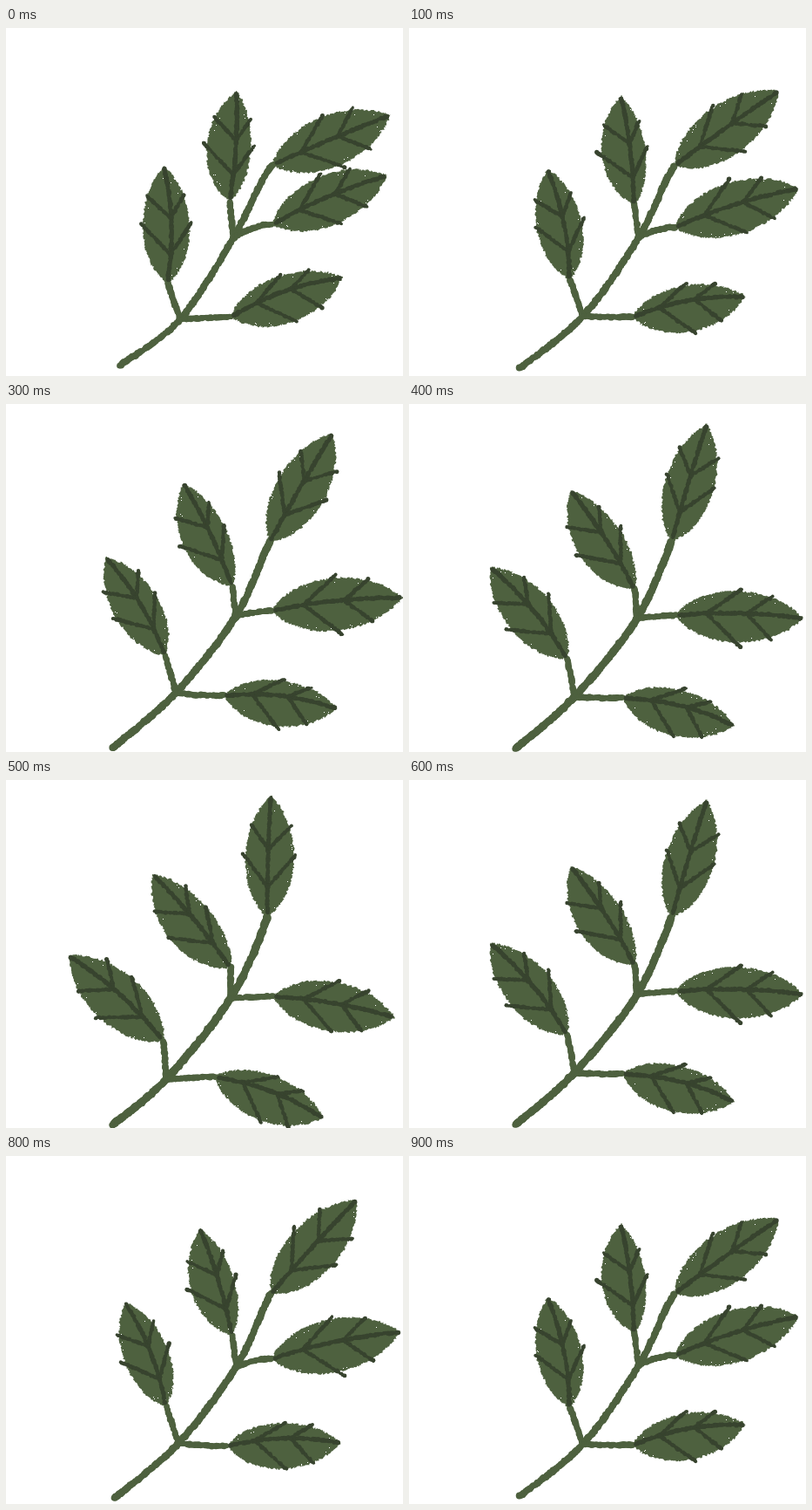
An HTML page with a canvas for the animation above (1 s loop, 456 by 399 pixels).

```html
<!DOCTYPE html>
<html>
<head>
<meta charset="utf-8">
<title>Swaying twig</title>
<style>
html, body { margin: 0; width: 100%; height: 100%; overflow: hidden; background: #fff; }
canvas { display: block; }
</style>
</head>
<body>
<canvas id="stage" width="456" height="399"></canvas>
<script>
const ctx = document.getElementById('stage').getContext('2d');
const GREEN = '#4e613f', VEIN = '#38442f';
const STEP = 100, LAST = 5;

// Each part is known at the start, past the middle and at the end of the sway.
const TIMES = [0, 3, LAST];

// Root, lower fork, upper fork.
const stem = [
  [131, 387, 200, 334, 261, 241],
  [123, 394, 195, 331, 264, 243],
  [123, 395, 184, 343, 258, 250]
];

// keys: base and tip; bend: bow of the midrib; lean: how far the blade sits off its axis.
const leaves = {
  lowLeft: { bend: 6, lean: 0, keys: [[186, 293, 182, 159], [183, 288, 115, 176], [181, 299, 72, 201]] },
  highLeft: { bend: 3, lean: -5, keys: [[257, 199, 265, 73], [260, 209, 204, 91], [258, 215, 169, 108]] },
  top: { bend: -1, lean: 1, keys: [[306, 157, 441, 100], [303, 158, 375, 34], [300, 157, 304, 18]] },
  right: { bend: -4, lean: 0, keys: [[306, 225, 437, 169], [305, 237, 455, 222], [307, 248, 446, 272]] },
  lowRight: { bend: -7, lean: 2, keys: [[258, 331, 386, 286], [250, 334, 380, 349], [240, 340, 364, 387]] }
};

// Smooth quadratic motion through the three keys.
function blend(keys, t) {
  const weights = TIMES.map(a => TIMES.reduce((w, b) => b === a ? w : w * (t - b) / (a - b), 1));
  return keys[0].map((_, i) => weights.reduce((sum, w, k) => sum + w * keys[k][i], 0));
}

let seed = 1;
const rand = () => (seed = seed * 16807 % 2147483647) / 2147483647;
const jitter = a => (rand() * 2 - 1) * a;
const mix = (p, q, t) => [p[0] + (q[0] - p[0]) * t, p[1] + (q[1] - p[1]) * t];

// Point on a Bezier curve of any degree.
function at(t, pts) {
  while (pts.length > 1) pts = pts.slice(1).map((q, i) => mix(pts[i], q, t));
  return pts[0];
}

function sample(pts) {
  let len = 0;
  for (let i = 1; i < pts.length; i++) {
    len += Math.hypot(pts[i][0] - pts[i - 1][0], pts[i][1] - pts[i - 1][1]);
  }
  const n = Math.ceil(len / 1.3);
  return Array.from({ length: n + 1 }, (_, i) => at(i / n, pts));
}

// Crayon line made of overlapping uneven dabs.
function crayon(pts, width, color) {
  ctx.fillStyle = color;
  for (const [x, y] of sample(pts)) {
    ctx.beginPath();
    ctx.arc(x + jitter(.6), y + jitter(.6), width / 2 + jitter(.6), 0, 7);
    ctx.fill();
  }
}

function drawStem(pose, ends) {
  const f = blend(stem, pose);
  const root = f.slice(0, 2), low = f.slice(2, 4), high = f.slice(4);
  const base = name => ends[name].slice(0, 2);
  const top = base('top');
  const main = [root, root, low, high, top, mix(top, ends.top.slice(2), .3)];
  for (let i = 1; i < 4; i++) {
    const [a, b, c, d] = main.slice(i - 1, i + 3);
    const h1 = [b[0] + (c[0] - a[0]) / 6, b[1] + (c[1] - a[1]) / 6];
    const h2 = [c[0] - (d[0] - b[0]) / 6, c[1] - (d[1] - b[1]) / 6];
    crayon([b, h1, h2, c], 7 + pose * .3, GREEN);
  }
  crayon([low, base('lowLeft')], 6.6, GREEN);
  crayon([high, base('highLeft')], 6.6, GREEN);
  for (const [fork, name] of [[high, 'right'], [low, 'lowRight']]) {
    const end = base(name);
    crayon([fork, [(fork[0] + end[0]) / 2, end[1] + 1], end], 6.6, GREEN);
  }
}

function drawLeaf([bx, by, tx, ty], bend, lean) {
  const dx = tx - bx, dy = ty - by, len = Math.hypot(dx, dy);
  // u runs from base to tip, v is the distance to the right of the axis.
  const place = (u, v) => [bx + dx * u - dy / len * v, by + dy * u + dx / len * v];
  const rim = w => [place(0, 0), place(.2, w * 4 / 3), place(.75, w * 4 / 3), place(1, 0)];
  const widths = [lean - len * .2, lean + len * .2];
  const [left, right] = widths.map(w => sample(rim(w)));
  const edge = [...left, ...right.reverse()];

  ctx.fillStyle = GREEN;
  ctx.beginPath();
  for (const [x, y] of edge) ctx.lineTo(x + jitter(1.2), y + jitter(1.2));
  ctx.fill();

  // Paper showing through near the rim.
  ctx.fillStyle = '#fff';
  const mid = place(.45, 0);
  for (let i = 0; i < 12; i++) {
    const [x, y] = mix(edge[Math.floor(rand() * edge.length)], mid, .04 + rand() * .12);
    ctx.fillRect(Math.round(x), Math.round(y), 1, 1);
  }

  const rib = [place(.03, 0), place(.5, bend * 2), place(.98, 0)];
  crayon(rib, 4.6, VEIN);
  for (const w of widths) {
    for (const [from, to] of [[.23, .53], [.56, .74]]) {
      crayon([at(from, rib), at(to, rim(w * (1 + rand() * .2)))], 4, VEIN);
    }
  }
}

function draw(pose) {
  seed = 97 + pose * 1013;
  ctx.fillStyle = '#fff';
  ctx.fillRect(0, 0, 456, 399);
  const ends = {};
  for (const name in leaves) ends[name] = blend(leaves[name].keys, pose);
  drawStem(pose, ends);
  for (const name in leaves) drawLeaf(ends[name], leaves[name].bend, leaves[name].lean);
}

// Sway there and back in hard steps.
let shown = -1;
function tick() {
  const step = Math.floor(performance.now() / STEP) % (2 * LAST);
  const pose = LAST - Math.abs(LAST - step);
  if (pose !== shown) draw(shown = pose);
  requestAnimationFrame(tick);
}
tick();
</script>
</body>
</html>
```
